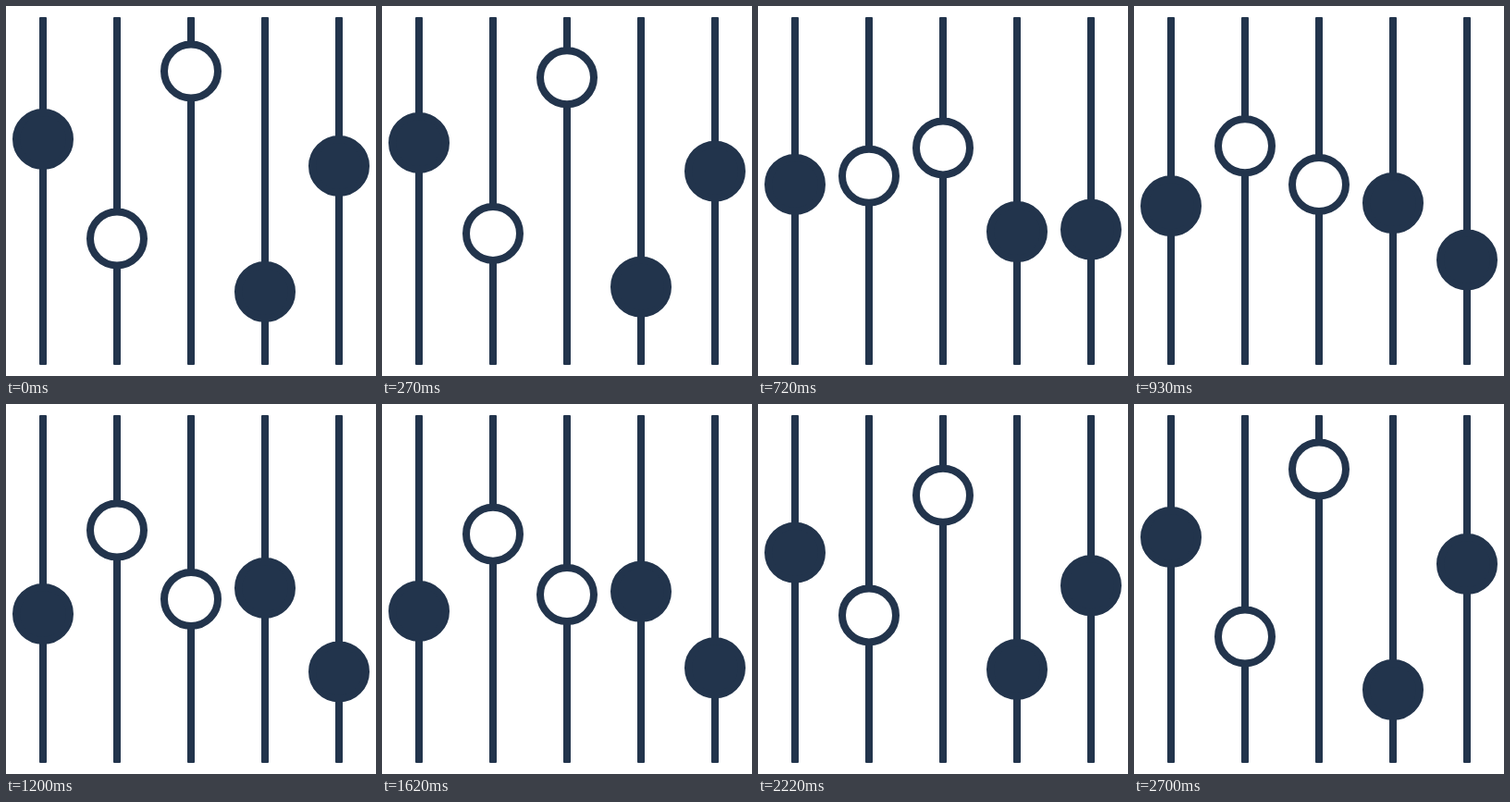
Write an HTML page that moves like this. It is 400 by 400 pixels and loops after 2.73 s.

```html
<!DOCTYPE html>
<html lang="en">
<head>
<meta charset="utf-8">
<title>Sliders</title>
<style>
  html, body { margin: 0; width: 100%; height: 100%; overflow: hidden; background: #fff; }
  svg { display: block; width: 100%; height: 100%; stroke: #22344c; stroke-width: 8; }
</style>
</head>
<body>
<svg viewBox="0 0 400 400"></svg>
<script>
const LOOP = 2730, HALF = 1350, STEP = 30;
const INK = '#22344c', PAPER = '#fff';
const sliders = [
  { x: 40,  from: 144,   to: 228,   fill: INK },
  { x: 120, from: 251.5, to: 135.1, fill: PAPER },
  { x: 200, from: 70.5,  to: 212.9, fill: PAPER },
  { x: 280, from: 309,   to: 197.5, fill: INK },
  { x: 360, from: 173,   to: 291,   fill: INK },
];

const svg = document.querySelector('svg');
function add(tag, attrs) {
  const node = document.createElementNS(svg.namespaceURI, tag);
  for (const key in attrs) node.setAttribute(key, attrs[key]);
  return svg.appendChild(node);
}

for (const s of sliders) {
  add('rect', { x: s.x - 4, y: 12, width: 8, height: 376, rx: 1, fill: INK, stroke: 'none' });
  s.knob = add('circle', { cx: s.x, r: 29, fill: s.fill });
}

// cubic-bezier(.6, 0, .4, 1), solved for the curve parameter by bisection
function ease(x) {
  let lo = 0, hi = 1;
  for (let i = 0; i < 24; i++) {
    const u = (lo + hi) / 2;
    if (u * (1.8 + u * (1.6 * u - 2.4)) < x) lo = u; else hi = u;
  }
  return lo * lo * (3 - 2 * lo);
}

function draw() {
  const t = Math.floor((performance.now() % LOOP) / STEP + 0.01) * STEP;
  const p = ease(Math.max(0, 1 - Math.abs(t - HALF) / HALF));
  for (const s of sliders) s.knob.setAttribute('cy', s.from + (s.to - s.from) * p);
  requestAnimationFrame(draw);
}
draw();
</script>
</body>
</html>
```
